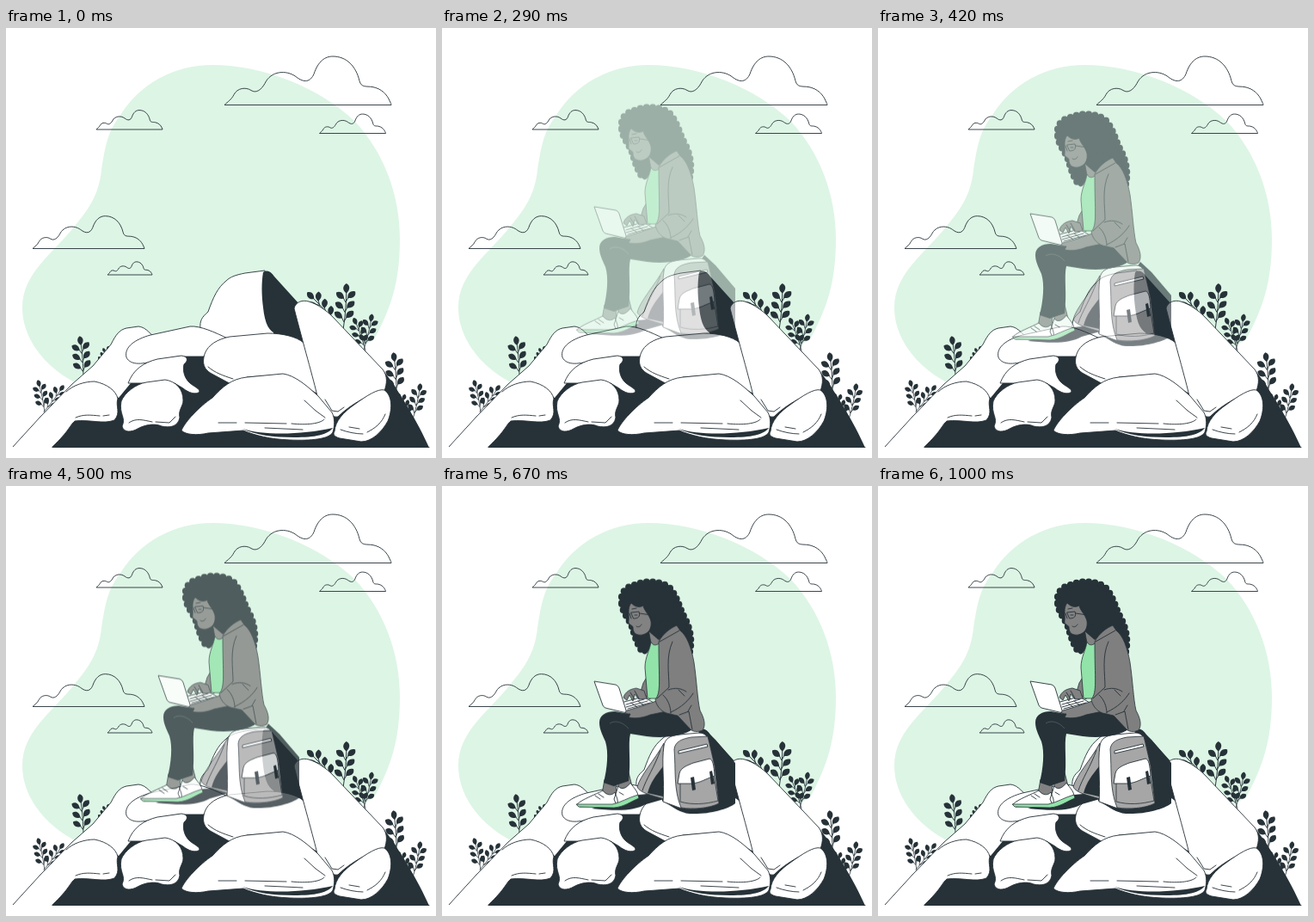
Animation, 500 px wide and 500 px high, one loop 1040 ms. Source, as an HTML page without scripts:

```html
<!DOCTYPE html>
<html lang="en">
<head>
<meta charset="utf-8">
<title>Working on the rocks</title>
<style>
html, body { margin: 0; width: 100%; height: 100%; overflow: hidden; background: #fff; }
svg { display: block; width: 100vw; height: 100vh; }
.line { fill: none; stroke: #263238; stroke-width: .9; stroke-linecap: round; stroke-linejoin: round; }
.rock { fill: #fff; stroke: #263238; stroke-width: .9; stroke-linejoin: round; }
.dark { fill: #263238; }
.skin { fill: #828282; }
.coat { fill: #7f7f7f; }
.grey { fill: #a6a6a6; }
.mint { fill: #92e3a9; }
.skin, .coat, .grey, .mint { stroke: #263238; stroke-width: .8; stroke-linejoin: round; }
.cloud { fill: none; stroke: #263238; stroke-width: .9; vector-effect: non-scaling-stroke; }
.curls { fill: none; stroke: #263238; stroke-width: 8; stroke-linecap: round; stroke-dasharray: 0 7.2; }
.show { animation: show 1040ms infinite; }
.drop { animation: drop 1040ms infinite; }
@keyframes show {
  0%, 12.45% { visibility: hidden; }
  12.5%, 100% { visibility: visible; }
}
/* settles at 1000 ms, with a slight overshoot */
@keyframes drop {
  0% { opacity: 0; transform: translateY(-29.9px); animation-timing-function: cubic-bezier(.346, .083, .499, 1.368); }
  96.15%, 100% { opacity: 1; transform: none; }
}
</style>
</head>
<body>
<svg viewBox="0 0 500 500">
  <defs>
    <path id="cloud" class="cloud" d="M0 0C4-4 8-6 11-12C15-20 25-21 31-17C37-13 43-18 47-25C54-40 72-41 83-33C93-25 100-27 104-36C109-51 117-56.5 126-56.5C142-56.5 153-45 157-28C159-20 165-22 172-21C183-19 189-12 192-5C193-3 194-1 194 0Z"/>
    <path id="leaf" d="M0 0C-5-3-5-8-1-11C4-9 4-4 0 0Z"/>
    <g id="pair">
      <use href="#leaf" transform="translate(-2 0) rotate(-52)"/>
      <use href="#leaf" transform="translate(2 -1) rotate(50)"/>
      <path class="line" d="M-3 -1L0 4L3 -2"/>
    </g>
    <g id="plant" class="dark">
      <path class="line" d="M0 0C1-15 1-28 0-42"/>
      <use href="#leaf" y="-41"/>
      <use href="#pair" y="-35"/>
      <use href="#pair" y="-24"/>
      <use href="#pair" y="-13"/>
    </g>
  </defs>

  <path fill="#ddf5e5" d="M240 43C300 43 365 70 405 108C440 145 458 195 458 245C458 295 448 325 428 362L300 440L100 420C60 408 19 370 19 325C19 285 55 262 80 230C95 212 108 195 111 165C115 140 118 120 132 103C155 65 195 43 240 43Z"/>

  <use href="#cloud" x="254" y="89.5"/>
  <use href="#cloud" transform="translate(31 256.5) scale(.67)"/>
  <use href="#cloud" transform="translate(105 118) scale(.397)"/>
  <use href="#cloud" transform="translate(364.5 122.5) scale(.397)"/>
  <use href="#cloud" transform="translate(118 287) scale(.268)"/>

  <use href="#plant" transform="translate(90 408) rotate(-4) scale(.96)"/>
  <use href="#plant" transform="translate(108 393) rotate(28) scale(.5)"/>
  <use href="#plant" transform="translate(45 447) rotate(-11) scale(.74)"/>
  <use href="#plant" transform="translate(44 446) rotate(38) scale(.74)"/>
  <use href="#plant" transform="translate(385 346) rotate(-41) scale(1)"/>
  <use href="#plant" transform="translate(392 351) rotate(5) scale(1.04)"/>
  <use href="#plant" transform="translate(418 375) rotate(-19) scale(.78)"/>
  <use href="#plant" transform="translate(416 374) rotate(14) scale(.82)"/>
  <use href="#plant" transform="translate(454 428) rotate(-3) scale(.98)"/>
  <use href="#plant" transform="translate(473 455) rotate(-30) scale(.68)"/>
  <use href="#plant" transform="translate(473 455) rotate(13) scale(.82)"/>

  <!-- rocks -->
  <path class="rock" d="M8 487L40 452L77 414L101 393L122 368C128 356 132 351 140 349L154 347C162 348 165 353 171 358L170 440L80 465L54 487" />
  <path class="dark" d="M54 488L78 455L130 428L150 405L205 380L300 350L345 360L440 400C455 419 480 460 492 488Z"/>
  <path fill="#fff" d="M100 412L145 370L200 365L180 400L145 413L131 430Z"/>
  <path class="rock" d="M226 350C225 340 228 336 235 330C241 313 246 302 256 294C261 289 268 287 278 285L301 282L312 358L257 362Z"/>
  <path class="dark" d="M299 284C304 281 308 283 312 289L341 321L346 366L316 356C306 354 301 344 299 325C297 310 297 296 299 284Z"/>
  <path class="rock" d="M140 383C137 371 150 362 168 357L214 347C226 346 243 354 258 361L240 369L230 382L200 382L176 386C160 391 145 393 140 383Z"/>
  <path class="rock" d="M142 413C148 397 160 389 176 385L204 381C212 382 212 387 207 391C205 399 208 408 214 413C220 418 225 419 225 423C221 427 212 424 206 419L196 413Z"/>
  <path class="rock" d="M134 434C138 424 151 414 163 412L185 409C198 411 206 420 206 433C206 440 200 444 202 453C200 464 190 465 181 463C172 459 160 462 153 466C146 470 137 471 135 463C140 453 131 449 134 434Z"/>
  <path class="rock" d="M231 379C235 368 246 362 260 359L304 355C322 355 338 359 346 366L365 427L322 403L280 406L267 417L241 403C229 397 228 389 231 379Z"/>
  <path class="rock" d="M335 326C337 318 345 316 352 318C362 321 372 328 380 336L438 397C444 405 443 413 440 422C424 425 401 437 386 452C380 453 375 449 368 440L362 428C358 410 345 365 335 326Z"/>
  <path class="rock" d="M204 468C208 458 225 440 240 430C252 417 262 408 280 406L322 402C336 404 350 416 363 428L379 447C383 455 382 463 380 470C376 478 355 480 330 479C307 478 290 474 276 468L235 471C222 474 209 473 204 468Z"/>
  <path class="dark" d="M275 466C300 474 345 473 380 465C374 473 360 476 335 476C310 476 290 473 275 466Z"/>
  <path class="rock" d="M382 469C383 457 392 447 405 438C420 427 433 419 440 421C450 428 449 445 444 457C437 470 425 481 413 481L388 477C381 475 380 472 382 469Z"/>
  <path fill="#fff" d="M9 487L66 426C78 415 92 411 103 411C118 414 128 422 130 431C127 440 134 447 126 456C113 461 98 455 80 457C74 462 74 468 54 487Z"/>
  <path class="line" d="M70 423C78 415 92 411 103 411C118 414 128 422 130 431C127 440 134 447 126 456C113 461 98 455 80 457C74 462 74 468 54 487M54 487.5H492"/>
  <path class="line" d="M81 453C90 449 98 450 109 451M113 451L120 450M143 459C151 453 160 456 170 458M174 458L190 459L197 452M235 394C243 401 252 404 264 408M247 459H268M278 459L326 460M332 460C350 462 366 460 370 455M301 465L345 467M347 433L360 445L371 453M371 432L379 445L386 446L393 441M389 467C397 470 407 472 415 472M420 470C430 465 437 459 441 449M399 464L411 466"/>

  <g class="show"><g class="drop">
    <!-- shadow -->
    <path class="dark" d="M174 375L228 359L260 356L258 364L237 370C222 378 205 378 174 375ZM256 362L305 283L318 295L341 322L341 369C332 376 310 382 288 381C277 380 270 374 256 366Z"/>

    <!-- backpack -->
    <path class="grey" d="M258 299C247 319 230 337 227 350C231 357 242 359 258 364Z"/>
    <path class="dark" d="M257 326C249 336 242 345 239 357L257 361Z"/>
    <path class="line" d="M254 307C248 325 237 341 233 354"/>
    <path class="rock" d="M258 302C259 294 265 290 276 289L299 287C306 287 309 291 311 298L317 325L322 369C310 375 288 377 276 374L257 367C259 343 255 322 258 302Z"/>
    <path class="grey" d="M270 306C271 297 279 294 290 292L309 291L317 325L322 369C310 375 292 376 278 374C269 352 272 330 270 306Z"/>
    <path class="rock" d="M275 308L308 300L309 303L275 311Z"/>
    <path class="grey" d="M277 341L316 335L321 366C306 370 291 371 277 367Z"/>
    <path class="rock" d="M276 334C278 327 285 325 292 322L311 317C315 318 316 324 317 337C305 341 301 345 290 346L274 346Z"/>
    <path class="dark" d="M289 339L293 338L295 353L291 354ZM311 332L314 331L317 346L313 347Z"/>

    <!-- legs and shoes -->
    <path class="skin" d="M204 343L206 354L221 349L217 333ZM189 341L186 358L202 363L203 344Z"/>
    <path class="rock" d="M200 364L205 349C209 354 215 351 219 345C223 351 228 355 228 361L203 371ZM157 370C163 364 178 359 187 354C191 360 198 360 201 356C203 362 206 366 203 372L160 373Z"/>
    <path class="mint" d="M156 370L198 370C208 368 217 362 228 359L229 363C219 367 212 373 200 374L159 373Z"/>
    <path class="line" d="M178 360L184 364M182 358L188 362M206 356L211 359"/>
    <path class="dark" d="M183 275C183 266 191 262 201 262L218 265C233 266 246 261 258 259L284 266L291 283C281 290 260 294 238 291L219 288C216 300 220 320 217 343L205 347L200 349L188 345C192 328 194 310 190 297C186 288 183 282 183 275Z"/>
    <path d="M195 276C201 272 210 274 217 282" fill="none" stroke="#657075" stroke-width=".6"/>

    <!-- hair and face -->
    <path class="dark" id="hair" d="M208 137C206 124 213 117 223 114C240 107 262 111 268 121C275 133 276 141 281 151C289 165 291 180 289 192L280 188L268 168L252 172L244 180C241 192 238 197 234 195C227 187 224 176 220 162C212 153 208 146 208 137Z"/>
    <path class="curls" d="M209 136C207 124 214 117 224 115C240 108 261 112 267 121C275 133 276 141 281 151C289 165 291 180 288 193M209 137C210 148 219 156 221 164C225 177 228 187 235 195"/>
    <path class="skin" d="M240 166L243 183L253 190L258 173Z"/>
    <path class="dark" d="M238 167L259 155L273 163L252 179Z"/>
    <path class="skin" d="M220 136C215 142 218 150 217 157C216 161 221 161 222 164C222 171 226 174 233 173C241 171 244 165 243 157C241 149 235 145 234 139C229 142 224 140 220 136Z"/>
    <path class="line" d="M220 147L229 146C231 152 228 154 223 154ZM230 148L243 150M218 148L220 154M226 163C228 165 231 163 232 161M221 143L226 142M224 150H227"/>

    <!-- top, far hand and laptop -->
    <path class="coat" d="M240 219L234 229L231 239L242 248Z"/>
    <path class="mint" d="M243 181C242 190 236 199 236 211L239 247L258 247L256 178C251 187 245 186 243 181Z"/>
    <path class="rock" d="M208 252L234 245L248 253L215 264Z"/>
    <path class="line" d="M214 254L235 248M214 257L239 250M216 259L242 252M220 252L227 257M228 250L235 255"/>
    <path class="skin" d="M211 246C213 239 219 236 226 235L235 238L238 247L229 248L224 242L222 250L218 243L215 249Z"/>
    <path class="line" d="M219 240L224 248M224 238L229 247"/>
    <path class="rock" d="M177 227L202 231Q205 232 206 235L215 264L190 258Q188 257 187 255Z"/>
    <path class="skin" d="M252 249L232 256L215 261C211 263 214 265 219 265L217 269C225 271 235 269 242 266L261 262Z"/>

    <!-- jacket -->
    <path class="coat" d="M252 181C257 171 266 165 273 162L277 168C285 174 290 188 293 205C296 225 297 248 300 261C305 270 307 278 303 284C298 286 294 286 290 284L274 267L261 264C253 261 249 254 248 248C255 240 252 225 252 181Z"/>
    <path class="line" d="M253 181L276 168M268 181C260 198 264 218 264 234L250 247M257 243C263 248 266 257 266 264M266 263C279 257 287 249 292 241M263 237C271 234 278 235 284 239M275 237L282 244M276 266L287 262L291 283M286 262L290 255"/>
  </g></g>
</svg>
</body>
</html>
```
